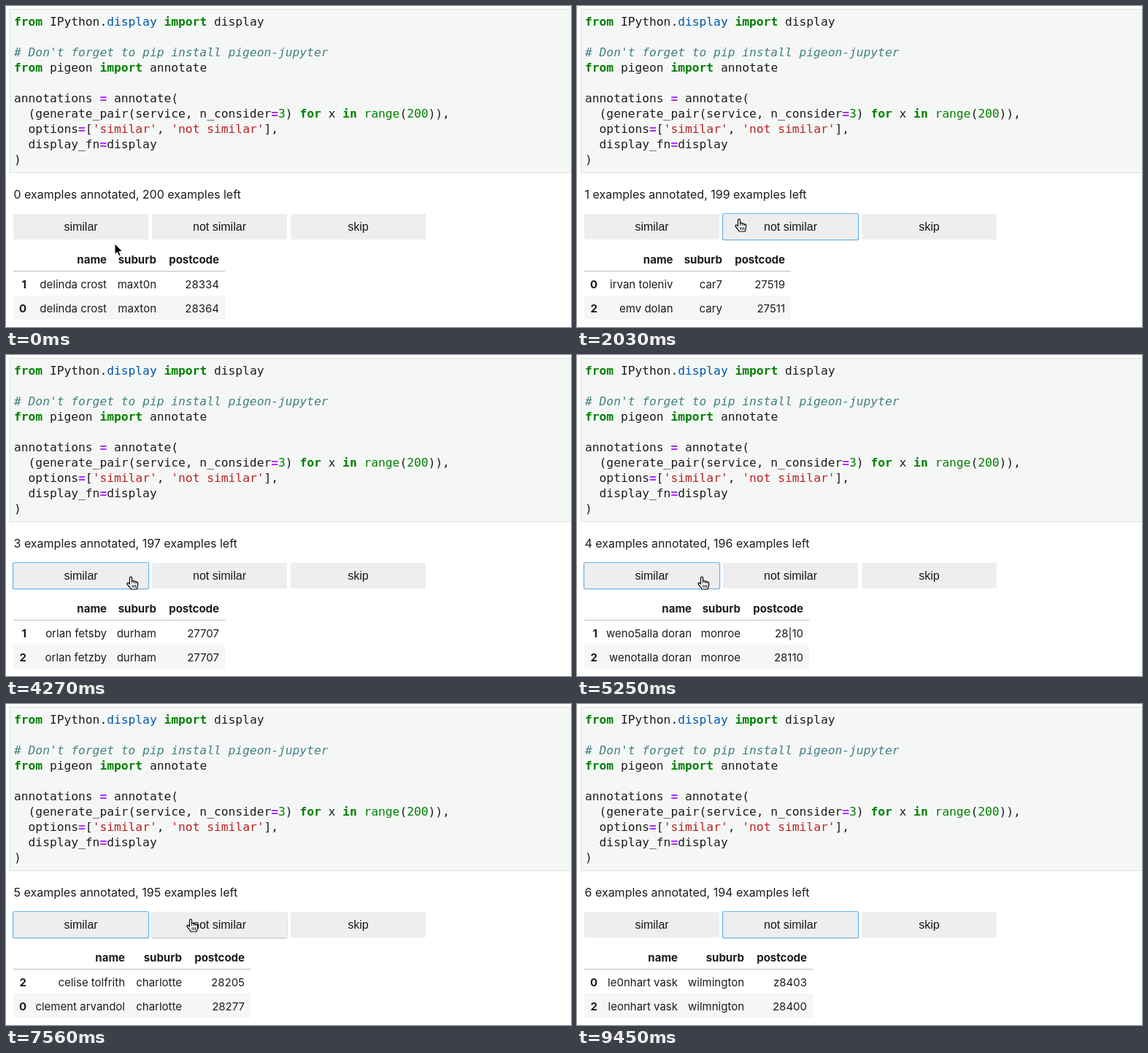
Recreate the animation shown at these times as an HTML page. Size 774x440 px, loop 9.52 s.

```html
<!DOCTYPE html>
<html lang="en">
<head>
<meta charset="utf-8">
<title>Annotating pairs</title>
<style>
  html, body { margin: 0; width: 100%; height: 100%; overflow: hidden; background: #fff; }
  svg { display: block; width: 774px; height: 440px; }
  text { white-space: pre; }
  .code text { font: 16.25px "DejaVu Sans Mono", monospace; fill: #1c1c1c; }
  .code .k { fill: #008000; font-weight: bold; }
  .code .b { fill: #008000; }
  .code .p { fill: #0055aa; }
  .code .o { fill: #aa22ff; font-weight: bold; }
  .code .s { fill: #ba2121; }
  .code .c { fill: #408080; font-style: italic; }
  .count { font: 16px Inter, sans-serif; fill: #1c1c1c; }
  .table text { font: 15px Inter, sans-serif; fill: #1c1c1c; text-anchor: end; }
  .table .h { font-weight: bold; }
  .btn text { font: 16px "Liberation Sans", Arial, sans-serif; fill: #151515; text-anchor: middle; }
  .raised { filter: drop-shadow(0 1.5px 1.2px rgba(0, 0, 0, .3)); }
</style>
</head>
<body>
<svg viewBox="0 0 774 440">
  <rect x="5.5" y="4.5" width="790" height="224" fill="#f5f7f6" stroke="#e0e0e0"/>
  <g class="code">
    <text x="11" y="27"><tspan class="k">from</tspan> IPython.<tspan class="p">display</tspan> <tspan class="k">import</tspan> display</text>
    <text x="11" y="69" class="c"><tspan class="c"># Don't forget to pip install pigeon-jupyter</tspan></text>
    <text x="11" y="90"><tspan class="k">from</tspan> pigeon <tspan class="k">import</tspan> annotate</text>
    <text x="11" y="132">annotations <tspan class="o">=</tspan> annotate(</text>
    <text x="11" y="153">  (generate_pair(service, n_consider<tspan class="o">=</tspan><tspan class="b">3</tspan>) <tspan class="k">for</tspan> x <tspan class="k">in</tspan> <tspan class="b">range</tspan>(<tspan class="b">200</tspan>)),</text>
    <text x="11" y="174">  options<tspan class="o">=</tspan>[<tspan class="s">'similar'</tspan>, <tspan class="s">'not similar'</tspan>],</text>
    <text x="11" y="195">  display_fn<tspan class="o">=</tspan>display</text>
    <text x="11" y="216">)</text>
  </g>
  <text id="count" class="count" x="10.5" y="264"></text>
  <g id="buttons" class="btn"></g>
  <g id="table" class="table"></g>
  <g id="cursor" stroke-linejoin="round" stroke-linecap="round">
    <path id="arrow" d="M0 0V14.5L3.4 11.4L5.7 16.6L8.2 15.5L5.9 10.5H10.5Z" fill="#000" stroke="#fff"/>
    <g id="hand" stroke="#000" stroke-width="1.2">
      <path fill="#fff" d="M-1.5 1.5C-1.5-.3 1.5-.3 1.5 1.5V6C2 5 4 5 4.3 6.5C5 5.6 6.8 6 7 7.4C7.8 6.6 9.5 7 9.5 8.8V12C9.5 14 8.2 15 8 17H0C-.5 15-3 13-4.6 10.6C-6 8.6-4 7.4-2.6 8.8L-1.5 10Z"/>
      <path fill="none" stroke-width="1" d="M1.5 6V8.5M4.3 6.5V8.8M7 7.4V9M2 11.5V14.5M4.3 11.5V14.5M6.6 11.5V14.5"/>
    </g>
  </g>
</svg>
<script>
const LOOP = 9520, STEP = 70;
const $ = id => document.getElementById(id);

function add(parent, tag, attrs, text = '') {
  const el = document.createElementNS('http://www.w3.org/2000/svg', tag);
  for (const key in attrs) el.setAttribute(key, attrs[key]);
  el.textContent = text;
  parent.append(el);
  return el;
}

// right edge of the table, right edge of the names, then rows
const pairs = [
  [300, 138, '1|delinda crost|maxt0n|28334', '0|delinda crost|maxton|28364'],
  [293, 131.5, '0|irvan toleniv|car7|27519', '2|emv dolan|cary|27511'],
  [297, 135, '2|edric vannir|raleigh|2761o', '0|edric vannier|raleigh|27610'],
  [300, 138, '1|orlan fetsby|durham|27707', '2|orlan fetzby|durham|27707'],
  [318, 157, '1|weno5alla doran|monroe|28,10', '2|wenotalla doran|monroe|28110'],
  [335, 163, '2|celise tolfrith|charlotte|28205', '0|clement arvandol|charlotte|28277'],
  [323, 138, '0|le0nhart vask|wilmington|z8403', '2|leonhart vask|wilmnigton|28400']
];

const buttons = ['similar', 'not similar', 'skip'].map((label, i) => {
  const x = 10 + 190 * i;
  const face = add($('buttons'), 'rect', { x, y: 285, width: 185, height: 35, rx: 1.5, fill: '#eee' });
  const ring = add($('buttons'), 'rect', {
    x: x - .5, y: 284.5, width: 186, height: 36, rx: 2, fill: 'none', stroke: '#64b5f6', 'stroke-width': 1.2
  });
  add($('buttons'), 'text', { x: x + 92.5, y: 308 }, label);
  return { x, face, ring };
});

const answered = [700, 2100, 3360, 4550, 5740, 7840];
// time, focused button
const focus = [[0, -1], [630, 0], [1960, 1], [3150, 0], [7700, 1]];
// time, x, y of the pointer
const path = [
  [0, 149, 326], [140, 149, 326], [560, 146, 295], [1120, 146, 295], [1820, 222, 292],
  [2310, 222, 292], [2940, 172, 304], [4000, 171, 304], [6440, 171, 304],
  [7420, 253, 295], [8120, 253, 295], [8750, 262, 446]
];

const ease = k => k * k * (3 - 2 * k);

function pointer(t) {
  const i = path.findIndex(p => p[0] > t);
  if (i < 0) return path[path.length - 1].slice(1);
  const [t0, x0, y0] = path[i - 1], [t1, x1, y1] = path[i];
  const k = ease((t - t0) / (t1 - t0));
  return [x0 + (x1 - x0) * k, y0 + (y1 - y0) * k];
}

let shown = -1;
function drawPair(n) {
  if (n === shown) return;
  shown = n;
  $('count').textContent = `${n} examples annotated, ${200 - n} examples left`;
  const table = $('table'), [edge, name, ...rows] = pairs[n];
  const cols = [28, name, edge - 94, edge - 8];
  table.replaceChildren();
  add(table, 'rect', { x: 10, y: 397, width: edge - 10, height: 33, fill: '#f5f7f6' });
  add(table, 'rect', { x: 10, y: 363, width: edge - 10, height: 1, fill: '#bdbdbd' });
  ['|name|suburb|postcode', ...rows].forEach((row, r) =>
    row.split('|').forEach((cell, c) => add(table, 'text', {
      x: cols[c], y: [353, 387, 420][r], class: r && c ? '' : 'h'
    }, cell.replace(',', '|'))));
}

function draw(time) {
  const t = Math.floor(time % LOOP / STEP) * STEP;
  drawPair(answered.filter(a => a <= t).length);

  const [x, y] = pointer(t);
  const active = focus.filter(f => f[0] <= t).pop()[1];
  let over = false;
  buttons.forEach((b, i) => {
    const hover = x >= b.x && x <= b.x + 185 && y >= 285 && y <= 320;
    over = over || hover;
    b.face.setAttribute('class', hover || i === active ? 'raised' : '');
    b.ring.style.display = i === active ? '' : 'none';
  });
  $('hand').style.display = over ? '' : 'none';
  $('arrow').style.display = over ? 'none' : '';
  $('cursor').setAttribute('transform', `translate(${x.toFixed(1)} ${y.toFixed(1)})`);
}

function tick() {
  draw(performance.now());
  requestAnimationFrame(tick);
}
tick();
</script>
</body>
</html>
```
